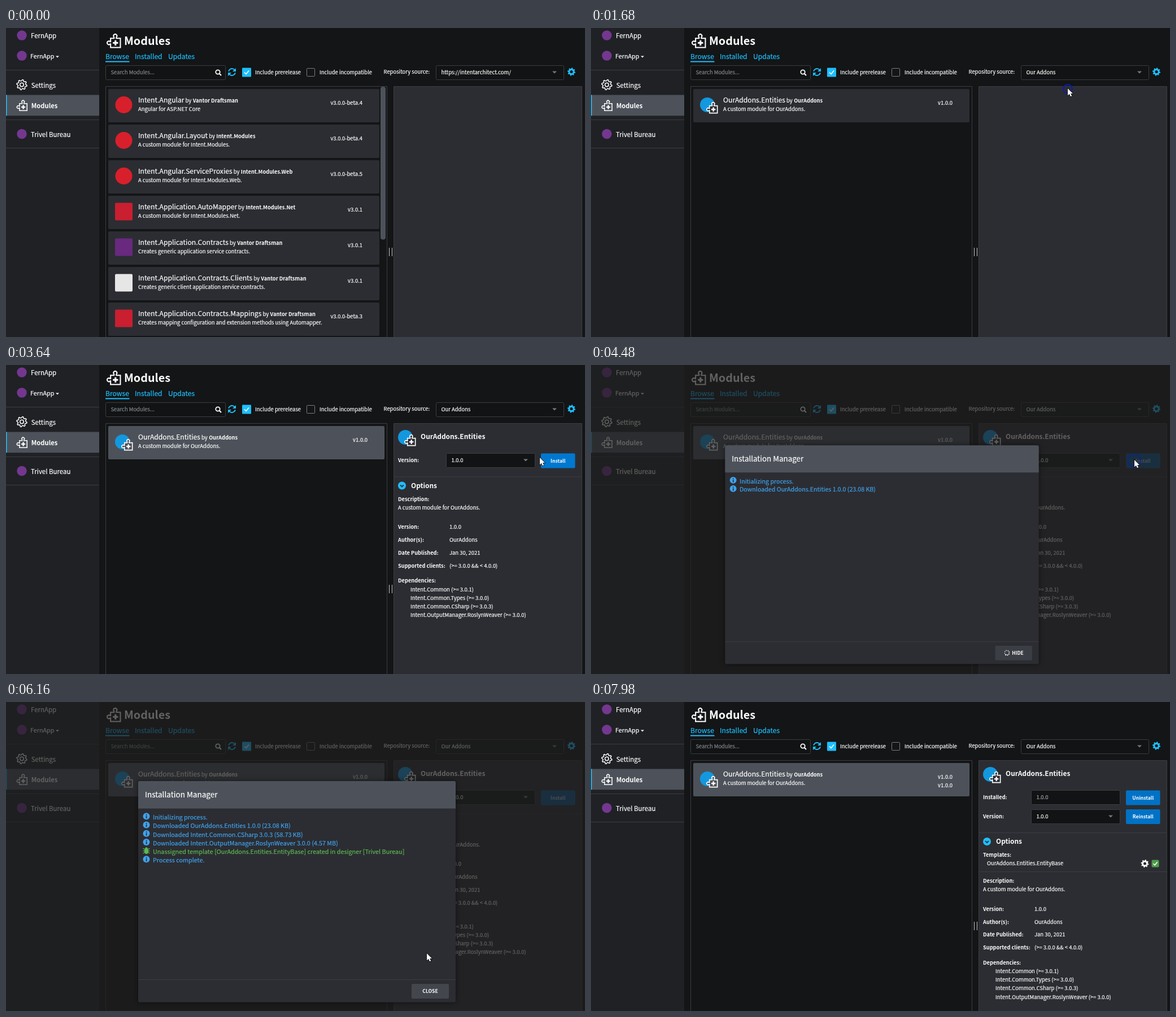
Animation of 1025 by 547 pixels, one loop 8950 ms. Source, as an HTML page with a canvas:

```html
<!DOCTYPE html>
<html lang="en">
<head>
<meta charset="utf-8">
<title>Module manager</title>
<style>
  html, body { margin: 0; width: 100%; height: 100%; overflow: hidden; background: #131516; }
  canvas { display: block; }
</style>
</head>
<body>
<canvas id="stage" width="1025" height="547"></canvas>
<script>
const c = document.getElementById('stage').getContext('2d');
const LOOP = 8950, STEP = 140, LAST = 7980;
const FAMILY = '"Noto Sans CJK JP", "Noto Sans CJK SC", "Noto Sans CJK KR", "Noto Sans CJK", "Noto Sans", sans-serif';
const WHITE = '#fff', BLUE = '#1ebfff', MAIN = '#131516', SIDE = '#1f2125',
      PANEL = '#2c2d32', ACTIVE = '#4d525a', LINE = '#3b3d42', PURPLE = '#74378f';

const clamp = v => Math.max(0, Math.min(1, v));
const smooth = v => v * v * (3 - 2 * v);

// y is the middle of the capitals; returns the right end of the text
function text(str, x, y, size = 10.5, color = WHITE, bold = false, align = 'left') {
  const baseline = Math.round(y + size * 0.33);
  c.font = `${bold ? 700 : 400} ${size * (bold ? 0.88 : 0.9)}px ${FAMILY}`;
  c.fillStyle = c.strokeStyle = color;
  c.textAlign = align;
  c.fillText(str, x, baseline);
  if (!bold) {
    c.lineWidth = 0.2;
    c.strokeText(str, x, baseline);
  }
  return x + c.measureText(str).width;
}
const label = (str, x, y, size) => text(str, x, y, size, WHITE, true);

function box(x, y, w, h, fill, radius = 0, stroke) {
  c.beginPath();
  c.roundRect(x, y, w, h, radius);
  if (fill) { c.fillStyle = fill; c.fill(); }
  if (stroke) { c.strokeStyle = stroke; c.lineWidth = 1; c.stroke(); }
}
function disc(x, y, r, fill) {
  c.beginPath();
  c.arc(x, y, r, 0, 7);
  c.fillStyle = fill;
  c.fill();
}
function line(color, width, ...points) {
  c.beginPath();
  points.forEach(([x, y]) => c.lineTo(x, y));
  c.strokeStyle = color;
  c.lineWidth = width;
  c.stroke();
}
function shape(fill, ...points) {
  c.beginPath();
  points.forEach(([x, y]) => c.lineTo(x, y));
  c.closePath();
  c.fillStyle = fill;
  c.fill();
}
const caret = (x, y, w, fill) => shape(fill, [x - w, y - w / 2], [x + w, y - w / 2], [x, y + w / 2]);
const tick = (x, y, s, color) => line(color, 1.6, [x - 4 * s, y], [x - s, y + 3 * s], [x + 4 * s, y - 3 * s]);

function gear(x, y, r, color, outlined) {
  c.beginPath();
  for (let i = 0; i < 32; i++) {
    const a = (i + 0.5) * Math.PI / 16, d = i % 4 < 2 ? r : r * 0.76;
    c.lineTo(x + d * Math.cos(a), y + d * Math.sin(a));
  }
  c.closePath();
  c.moveTo(x + r * 0.36, y);
  c.arc(x, y, r * 0.36, 0, 7);
  c.fillStyle = c.strokeStyle = color;
  c.lineWidth = 1.5;
  outlined ? c.stroke() : c.fill('evenodd');
}

// Puzzle piece with a plus, 25 units wide
function puzzle(x, y, s, back) {
  c.save();
  c.translate(x, y);
  c.scale(s, s);
  c.beginPath();
  c.moveTo(7, 8); c.lineTo(13, 8);
  c.arc(15, 4, 3, 2.3, 0.84);
  c.lineTo(17, 8); c.lineTo(24, 8); c.lineTo(24, 24); c.lineTo(7, 24); c.lineTo(7, 18);
  c.arc(4, 16, 3, 0.73, 5.55);
  c.lineTo(7, 14);
  c.closePath();
  c.fillStyle = back;
  c.fill();
  c.strokeStyle = WHITE;
  c.lineWidth = 2;
  c.stroke();
  box(14, 11.5, 3, 9, WHITE);
  box(11, 14.5, 9, 3, WHITE);
  c.restore();
}
function moduleIcon(x, y, back) {
  disc(x + 13, y + 15, 13, '#1398df');
  puzzle(x + 11, y + 10, 0.82, back);
}

function refreshIcon(x, y) {
  for (const side of [1, -1]) {
    c.save();
    c.translate(x, y);
    c.scale(side, side);
    c.beginPath();
    c.arc(0, 0, 6, 3.35, 5.7);
    c.strokeStyle = BLUE;
    c.lineWidth = 2;
    c.stroke();
    shape(BLUE, [7, -7], [7, -1], [1, -1]);
    c.restore();
  }
}

function field(x, y, w, str, color = WHITE, arrow = true) {
  box(x + 0.5, y + 0.5, w - 1, 25, '#111314', 2, LINE);
  text(str, x + 9.5, y + 13, 10.5, color);
  if (arrow) caret(x + w - 17, y + 12.5, 4, '#77797d');
}
function button(str, x, y, w, fill, color = WHITE) {
  box(x, y, w, 26, fill, 2);
  text(str, x + w / 2, y + 13, 9.75, color, true, 'center');
}

function sidebar() {
  box(0, 0, 165, 547, SIDE);
  for (const y of [74, 162, 212]) box(0, y, 165, 1, LINE);
  box(0, 118.5, 165, 36.75, ACTIVE);
  box(0, 118.5, 1.5, 36.75, BLUE);
  for (const y of [13, 49, 187.5]) disc(28, y, 8.7, PURPLE);
  text('FernApp', 44, 14, 12.75);
  text('FernApp', 43, 50, 12);
  caret(91, 51, 3, WHITE);
  gear(28, 100.5, 9, WHITE, true);
  text('Settings', 44.7, 101.5, 12.75);
  puzzle(18.5, 127.5, 0.78, ACTIVE);
  label('Modules', 44.7, 138, 12.75);
  text('Trivel Bureau', 44, 188.5, 12.75);
}

function header(source) {
  puzzle(178, 10, 1.02, MAIN);
  label('Modules', 209, 23, 22.5);
  text('Browse', 176, 50.5, 13.5, BLUE);
  text('Installed', 228, 50.5, 13.5, BLUE);
  text('Updates', 287, 50.5, 13.5, BLUE);
  box(176, 58.5, 42.5, 2, BLUE);
  field(176, 66, 213, 'Search Modules...', '#85888c', false);
  c.beginPath();
  c.arc(375, 78, 3.7, 0, 7);
  c.strokeStyle = WHITE;
  c.lineWidth = 1.8;
  c.stroke();
  line(WHITE, 2.2, [377.7, 80.7], [381, 84]);
  refreshIcon(400, 78);
  box(418, 70.5, 16, 16, BLUE, 1);
  tick(426, 78.5, 1, WHITE);
  text('Include prerelease', 441, 78.5);
  box(532.5, 71.5, 14, 14, null, 1, '#7b7d81');
  text('Include incompatible', 555, 78.5);
  text('Repository source:', 668.5, 78);
  field(761, 66, 227, source);
  gear(1001, 77.5, 7.2, BLUE);
}

function card(y, w, fill, [name, author, about, version, mark], installed) {
  box(181, y, w, 59, fill, 2);
  if (mark === 'module') moduleIcon(193, y + 13, fill);
  else if (mark === RED) disc(208.5, y + 28, 15, mark);
  else box(193, y + 12.5, 31, 31, mark, 2);
  let x = text(name, 234, y + 20, 13.5);
  x = text('by', x + 2, y + 20.5);
  label(author, x + 2.5, y + 20.5);
  text(about, 234, y + 36);
  const right = 151 + w;
  text(version, right, y + 24.5, 10.5, WHITE, false, 'right');
  if (installed) text(version, right, y + 40, 10.5, WHITE, false, 'right');
}

const RED = '#d8202c', CRIMSON = '#c91f30';
const catalog = [
  ['Intent.Angular', 'Vantor Draftsman', 'Angular for ASP.NET Core', 'v3.0.0-beta.4', RED],
  ['Intent.Angular.Layout', 'Intent.Modules', 'A custom module for Intent.Modules.', 'v3.0.0-beta.4', RED],
  ['Intent.Angular.ServiceProxies', 'Intent.Modules.Web', 'A custom module for Intent.Modules.Web.', 'v3.0.0-beta.5', RED],
  ['Intent.Application.AutoMapper', 'Intent.Modules.Net', 'A custom module for Intent.Modules.Net.', 'v3.0.1', CRIMSON],
  ['Intent.Application.Contracts', 'Vantor Draftsman', 'Creates generic application service contracts.', 'v3.0.1', '#68297e'],
  ['Intent.Application.Contracts.Clients', 'Vantor Draftsman', 'Creates generic client application service contracts.', 'v3.0.1', '#e6e6e6'],
  ['Intent.Application.Contracts.Mappings', 'Vantor Draftsman', 'Creates mapping configuration and extension methods using Automapper.', 'v3.0.0-beta.3', CRIMSON]
];
const ownModule = ['OurAddons.Entities', 'OurAddons', 'A custom module for OurAddons.', 'v1.0.0', 'module'];

function list(t) {
  box(176.5, 103.5, 498, 500, null, 0, LINE);
  if (t < 1540) {
    catalog.forEach((item, i) => card(108 + 63 * i, 480, PANEL, item));
    box(663, 104, 9, 270.5, ACTIVE, 4);
  } else if (t >= 1680) {
    card(108, 489, t >= 2800 ? ACTIVE : PANEL, ownModule, t >= 7140);
  }
  box(678, 389, 1, 15, '#c8c8c8');
  box(683, 389, 1, 15, '#c8c8c8');
}

function details(t) {
  box(686.5, 103.5, 333, 500, PANEL, 0, LINE);
  if (t < 2940) return;
  const done = t >= 7560, options = done ? 247 : 213.5;
  moduleIcon(694, 113, PANEL);
  label('OurAddons.Entities', 734, 127, 13.5);
  if (done) {
    label('Installed:', 694, 169);
    field(779, 156, 158, '1.0.0', '#a4a6a9', false);
    button('Uninstall', 947, 156.5, 60.5, '#0072c6');
    label('Version:', 694, 202.5);
    field(779, 190, 158, '1.0.0');
    button('Reinstall', 947, 190, 60.5, '#0072c6');
    label('Templates:', 694, 271);
    text('OurAddons.Entities.EntityBase', 701, 286);
    gear(980.5, 286, 7, WHITE);
    box(992.5, 279.5, 13, 13, '#4f9a4a', 2);
    tick(999, 286, 0.9, WHITE);
    box(687, 300, 333, 1, LINE);
  } else {
    const busy = t >= 4060;
    label('Version:', 694, 169);
    field(779, 156, 158, '1.0.0');
    button('Install', 947, 156.5, 60.5, busy ? '#0f5891' : '#0078d0', busy ? '#a9bccb' : WHITE);
  }
  box(687, options - 16, 333, 1, LINE);
  disc(701, options, 7, BLUE);
  line(PANEL, 1.8, [698, options - 1], [701, options + 2], [704, options - 1]);
  label('Options', 717, options, 13.5);

  const y = done ? 317 : 237.5;
  label('Description:', 694, y);
  text('A custom module for OurAddons.', 694, y + 15);
  [['Version:', '1.0.0'], ['Author(s):', 'OurAddons'], ['Date Published:', 'Jan 30, 2021'],
   ['Supported clients:', '(>= 3.0.0 && < 4.0.0)']].forEach(([key, value], i) => {
    label(key, 694, y + 49.3 + 22.8 * i);
    text(value, 785, y + 49.3 + 22.8 * i);
  });
  label('Dependencies:', 694, y + 144.3);
  ['Intent.Common (>= 3.0.1)', 'Intent.Common.Types (>= 3.0.0)', 'Intent.Common.CSharp (>= 3.0.3)',
   'Intent.OutputManager.RoslynWeaver (>= 3.0.0)'].forEach((str, i) => text(str, 716, y + 159.6 + 15.2 * i));
}

function dropdown() {
  box(761.5, 92.5, 226, 30, '#191b1d', 0, LINE);
  box(762, 107, 225, 15, ACTIVE);
  text('https://intentarchitect.com/', 770, 100);
  text('Our Addons', 770, 114.5);
}

const log = [
  [4340, 'Initializing process.'],
  [4480, 'Downloaded OurAddons.Entities 1.0.0 (23.08 KB)'],
  [4900, 'Downloaded Intent.Common.CSharp 3.0.3 (58.73 KB)'],
  [5320, 'Downloaded Intent.OutputManager.RoslynWeaver 3.0.0 (4.57 MB)'],
  [5740, 'Unassigned template [OurAddons.Entities.EntityBase] created in designer [Trivel Bureau]', true],
  [5880, 'Process complete.']
];

function bug(x, y, color) {
  for (const dy of [-3, 0, 3]) line(color, 1.2, [x - 6, y + dy * 1.4], [x, y + dy * 0.6], [x + 6, y + dy * 1.4]);
  c.beginPath();
  c.ellipse(x, y + 0.5, 3.6, 5, 0, 0, 7);
  c.fillStyle = color;
  c.fill();
  disc(x, y - 4, 2.3, color);
}

function modal(t) {
  const opening = 1 - (1 - clamp((t - 4180) / 430)) ** 3;
  const shown = opening * (1 - clamp((t - 7110) / 200));
  if (!shown) return;
  c.globalAlpha = clamp((shown - 0.2) / 0.75);
  box(0, 0, 1025, 547, 'rgba(31,31,31,.7)');
  c.globalAlpha = clamp(shown / 0.95);
  c.save();
  const scale = 0.57 + 0.43 * shown;
  c.translate(515, 335.5);
  c.scale(scale, scale);
  c.translate(-515, -335.5);
  c.shadowColor = 'rgba(0,0,0,.5)';
  c.shadowBlur = 8;
  box(234, 140, 562, 391.5, PANEL, 3);
  c.shadowBlur = 0;
  box(234, 140, 562, 48.5, ACTIVE, [3, 3, 0, 0]);
  text('Installation Manager', 246, 164.5, 15);
  log.forEach(([start, str, warning], i) => {
    if (t < start) return;
    const y = 204.3 + 15.2 * i, color = warning ? '#5cb854' : '#3fa3ee';
    if (warning) bug(248.5, y - 1.5, color);
    else {
      disc(248.5, y - 2, 6, color);
      box(247.7, y - 5.5, 1.8, 1.8, PANEL);
      box(247.7, y - 2.7, 1.8, 4.4, PANEL);
    }
    text(str, 260, y, 12, color);
  });
  box(234, 491, 562, 1, LINE);
  if (t >= 6020) button('CLOSE', 718, 499, 66, '#43474d');
  else {
    button('', 718, 499, 66, '#3b3e44');
    for (let i = 0; i < 8; i++) {
      const a = i * Math.PI / 4 + t / 160;
      disc(739 + 4.2 * Math.cos(a), 511.5 + 4.2 * Math.sin(a), 0.7 + i * 0.07, WHITE);
    }
    label('HIDE', 748, 512, 9.75);
  }
  c.restore();
  c.globalAlpha = 1;
}

// [time, x, y] of the pointer tip
const path = [
  [420, 860, 330], [980, 845, 80], [1120, 845, 80], [1400, 844, 107], [1680, 844, 107],
  [2520, 480, 136], [2800, 480, 136], [3640, 945, 164], [3920, 962, 168], [5040, 962, 168],
  [6160, 745, 445], [6720, 749, 509], [LAST, 749, 509]
];
const clicks = [980, 1540, 2800, 4060, 7000];

function pointer(t) {
  if (t < path[0][0] || t >= LAST) return;
  const i = path.findIndex(p => p[0] > t), [t0, x0, y0] = path[i - 1], [t1, x1, y1] = path[i];
  const k = smooth((t - t0) / (t1 - t0)), x = x0 + (x1 - x0) * k, y = y0 + (y1 - y0) * k;
  const age = t - clicks.filter(at => at <= t).pop();
  if (age < 490) {
    c.beginPath();
    c.arc(x, y + 1, 6 + age * 0.0125, 0, 7);
    c.strokeStyle = `rgba(12,30,165,${1 - (age / 600) ** 2})`;
    c.lineWidth = 2.4;
    c.stroke();
  }
  const arrow = [[0, 0], [0, 12.5], [2.9, 9.8], [5, 14.3], [7.2, 13.3], [5.1, 9], [9, 9], [0, 0], [0, 3]]
    .map(([dx, dy]) => [x + dx, y + dy]);
  line('#0c0c0c', 1.4, ...arrow);
  shape('#fff', ...arrow);
}

function draw(now) {
  const t = Math.min(Math.floor(now % LOOP / STEP) * STEP, LAST);
  box(0, 0, 1025, 547, MAIN);
  sidebar();
  header(t < 1540 ? 'https://intentarchitect.com/' : 'Our Addons');
  list(t);
  details(t);
  if (t >= 1120 && t < 1540) dropdown();
  modal(t);
  pointer(t);
}

const begin = performance.now();
(function frame() {
  draw(performance.now() - begin);
  requestAnimationFrame(frame);
})();
</script>
</body>
</html>
```
